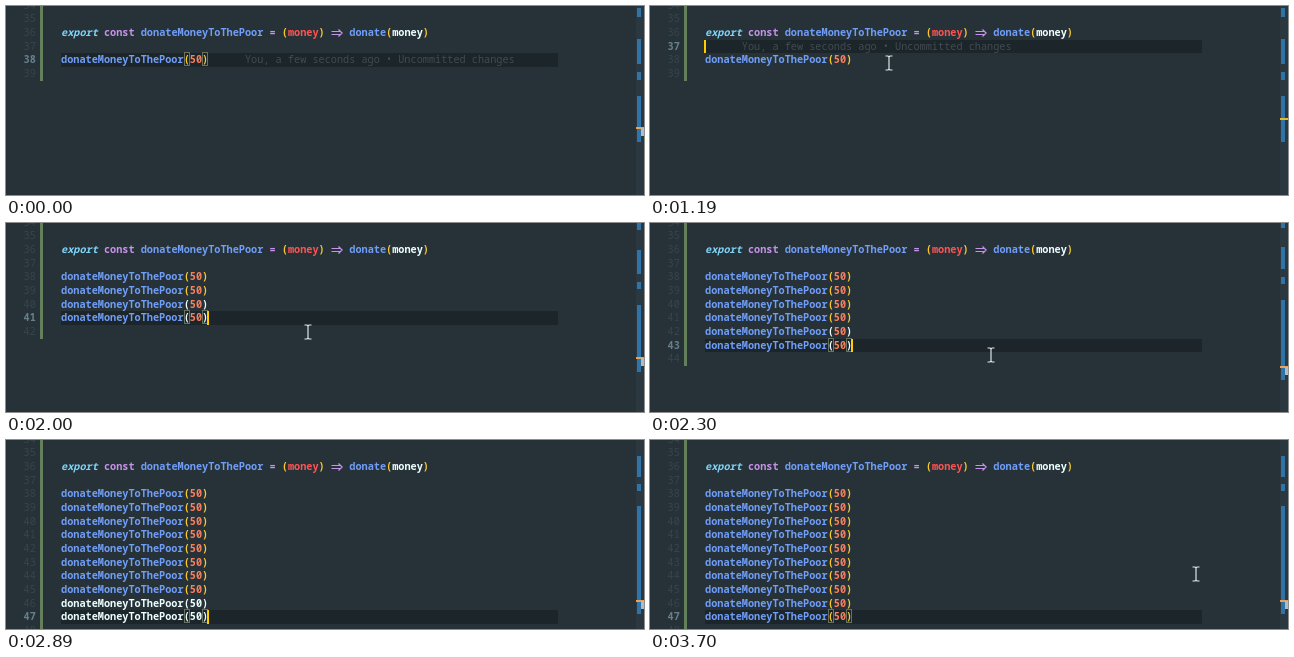
Write an HTML page that moves like this. It is 638 px wide and 189 px high and loops after 3770 ms.

```html
<!DOCTYPE html>
<html lang="en">
<head>
<meta charset="utf-8">
<title>Editor</title>
<style>
  html, body { margin: 0; width: 100%; height: 100%; overflow: hidden; background: #263238; }
  #stage {
    position: relative; width: 638px; height: 189px; overflow: hidden; background: #263238;
    font: 600 10.22px/13.67px "Noto Sans Mono", "DejaVu Sans Mono", monospace;
    font-variant-ligatures: none;
  }
  #stage div, #mouse { position: absolute; white-space: pre; }
  .row { left: 55px; height: 13.67px; color: #709ef8; }
  .num { left: 17.5px; height: 13.67px; color: #37454c; font-weight: 400; }
  .num.on { color: #67808c; font-weight: 600; }
  .kw { color: #7fd3f7; font-style: italic; }
  .op { color: #c792ea; }
  .arg { color: #ff5452; }
  .val { color: #eeffff; }
  .n { color: #f7805f; }
  .p { color: #fbc92d; }
  .call.on .p { box-shadow: inset 0 0 0 1px #68705f; }
  .half .p, .tail:not(.on) .close, .raw, .raw .p, .raw .n { color: #eeffff; }
  .op svg { width: 2ch; height: 8px; vertical-align: -1px; }
  svg path { fill: none; stroke: currentColor; }
  #band { left: 55px; width: 497px; height: 13.67px; background: #1b252a; }
  #blame { color: #424c50; font-weight: 400; }
  #caret { width: 2px; height: 13.67px; background: #ffcc00; }
  #git { left: 34px; top: 0; width: 3px; background: #63805a; }
  #ruler { left: 630px; top: 0; width: 8px; height: 189px; background: #2b383f; }
  .block { left: 631px; width: 4px; background: #2f74a9; }
  #mark { left: 630px; width: 8px; height: 2px; }
  #pair { left: 635px; width: 3px; height: 8px; background: #b4bbbd; }
  #mouse { left: 0; top: 0; width: 9px; height: 17px; color: #dfe5e7; }
</style>
</head>
<body>
<div id="stage"></div>
<script>
const LOOP = 3770, STEP = 74.07, PITCH = 13.67, CALLS = 10;
const stage = document.getElementById('stage');
const top0 = line => 47.3 + (line - 38) * PITCH;

function add(cls, html = '', id = '') {
  const el = document.createElement('div');
  el.className = cls;
  el.id = id;
  el.innerHTML = html;
  stage.append(el);
  return el;
}
const place = (el, y, h) => {
  el.style.top = y + 'px';
  if (h !== undefined) el.style.height = Math.max(0, h) + 'px';
};
const show = (el, on) => { el.style.visibility = on ? 'visible' : 'hidden'; };
const span = (cls, text) => `<span class="${cls}">${text}</span>`;
const parens = inner => span('p', '(') + inner + span('p close', ')');

const band = add('', '', 'band');
const git = add('', '', 'git');
const nums = [];
for (let line = 34; line <= 48; line++) {
  const el = add('num', line);
  place(el, top0(line));
  nums.push(el);
}

const arrow = '<svg viewBox="0 0 12.3 8"><path d="M.5 2.5H10M.5 5.5H10M7.5 .5L11.2 4L7.5 7.5" stroke-width="1.2"/></svg>';
const head = add('row', span('kw', 'export') + ' ' + span('op', 'const') + ' donateMoneyToThePoor ' +
  span('op', '=') + ' ' + parens(span('arg', 'money')) + ' ' + span('op', arrow) +
  ' donate' + parens(span('val', 'money')));
place(head, top0(36));

const calls = [];
for (let i = 0; i < CALLS; i++) {
  const el = add('row call', 'donateMoneyToThePoor' + parens(span('n', '50')));
  place(el, top0(38 + i));
  calls.push(el);
}

const blame = add('', 'You, a few seconds ago • Uncommitted changes', 'blame');
const caret = add('', '', 'caret');
add('', '', 'ruler');
// top, top shift per added line, bottom, bottom shift
const blocks = [[2, -1, 11, -1.2], [33, -1.9, 58, -2.35], [66, -2.45, 74, -2.55], [90, -2.67, 136, 4.25]]
  .map(b => ({ b, el: add('block') }));
const mark = add('', '', 'mark');
const pair = add('', '', 'pair');
stage.insertAdjacentHTML('beforeend',
  '<svg id="mouse" viewBox="0 0 9 17"><path d="M1 1.5H3.5L4.5 2.5L5.5 1.5H8M4.5 2.5V14.5M1 15.5H3.5L4.5 14.5L5.5 15.5H8" stroke-width="1.2"/></svg>');
const mouse = document.getElementById('mouse');

// step, active line, number of calls, caret, blame, colouring of the newest calls
const states = [
  [0, 38, 1, 0, 1, ''], [5, 39, 1, 1, 0, ''], [10, 37, 1, 1, 0, ''], [13, 37, 1, 1, 1, ''],
  [18, 38, 1, 1, 0, ''], [22, 39, 2, 1, 0, 'tail'], [24, 40, 3, 1, 0, 'half'],
  [26, 41, 4, 1, 0, 'half'], [28, 42, 5, 1, 0, 'half'], [30, 43, 6, 1, 0, 'half'],
  [33, 44, 7, 1, 0, 'half'], [35, 45, 8, 1, 0, 'half'], [37, 46, 9, 1, 0, 'raw'],
  [38, 47, 10, 1, 0, 'raw'], [42, 47, 10, 1, 0, ''], [45, 47, 10, 0, 0, '']
];
// step, x, y
const path = [
  [1, 240, 92], [4, 241, 69], [6, 242, 66], [8, 241, 50], [9, 241, 48], [10, 241, 42],
  [12, 241, 42], [16, 239, 57], [18, 239, 58], [20, 239, 58], [23, 263, 86], [31, 341, 132],
  [35, 385, 162], [37, 410, 178], [39, 430, 205], [41, 540, 205], [42, 556, 185],
  [44, 558, 146], [45, 553, 136], [46, 548, 133], [47, 548, 133], [50, 546, 134]
];

function pointer(k) {
  const i = path.findIndex(p => p[0] >= k);
  if (i < 1) return i < 0 ? path[path.length - 1] : path[0];
  const a = path[i - 1], b = path[i], f = (k - a[0]) / (b[0] - a[0]);
  return a.map((v, j) => v + (b[j] - v) * f);
}

function draw(k) {
  const [, line, count, blink, note, fresh] = states.filter(s => s[0] <= k).pop();
  const extra = count - 1, atCall = line === 37 + count;
  const left = atCall ? 24 * 6.132 : 0;

  place(band, top0(line));
  place(git, 0, top0(38 + count) + PITCH);
  nums.forEach((el, i) => {
    el.classList.toggle('on', i + 34 === line);
    show(el, i + 34 <= 38 + count);
  });
  calls.forEach((el, i) => {
    const mode = i >= count - 2 ? fresh : '';
    el.className = `row call ${mode} ${i + 38 === line ? 'on' : ''}`;
    show(el, i < count);
  });

  place(blame, top0(line));
  blame.style.left = 55 + left + 36.8 + 'px';
  show(blame, note);
  place(caret, top0(line));
  caret.style.left = 54 + left + 'px';
  show(caret, blink);

  blocks.forEach(({ b, el }) => {
    const y = b[0] + b[1] * extra;
    place(el, y, b[2] + b[3] * extra - y);
  });
  const y = Math.round(atCall ? 121 + 4.3 * extra : line === 37 ? 112 : 129);
  place(mark, y);
  mark.style.background = atCall ? '#e6a45c' : line === 37 ? '#e5bd2c' : '#d8898b';
  place(pair, y + 1);
  show(pair, atCall);

  const [, mx, my] = pointer(k);
  mouse.style.transform = `translate(${Math.round(mx) - 4.5}px, ${Math.round(my) - 8.5}px)`;
  show(mouse, k > 0);
}

let last = -1;
const start = performance.now();
function tick() {
  const t = (performance.now() - start) % LOOP;
  const k = Math.min(50, Math.floor((t + 5) / STEP));
  if (k !== last) draw(last = k);
  requestAnimationFrame(tick);
}
tick();
</script>
</body>
</html>
```
